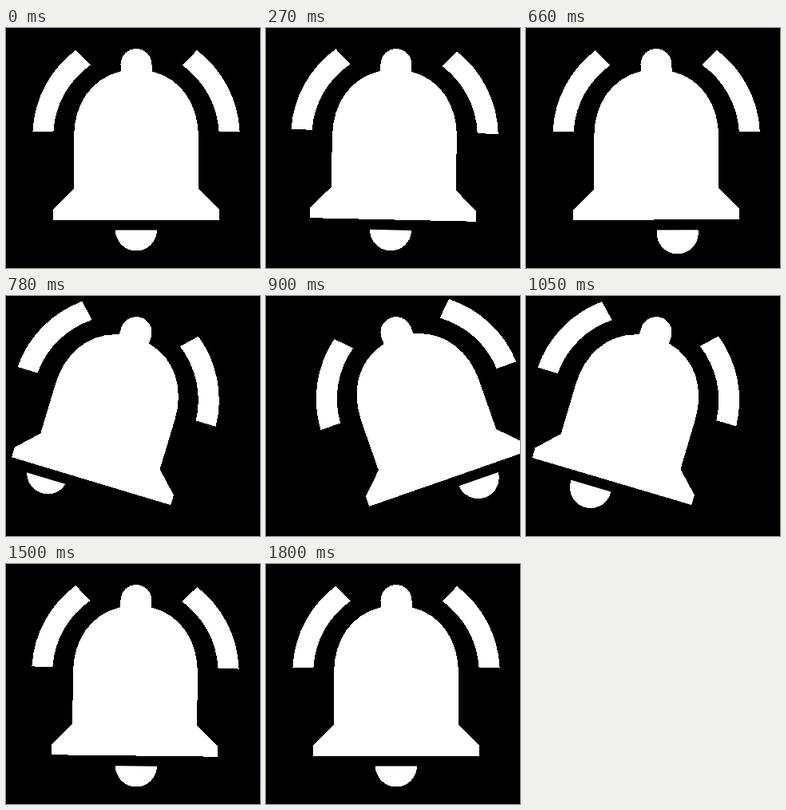
Write an HTML page that moves like this. It is 318x301 px and loops after 2.7 s.

```html
<!DOCTYPE html>
<html lang="en">
<head>
<meta charset="utf-8">
<title>Ringing bell</title>
<style>
  html, body { margin: 0; width: 100%; height: 100%; overflow: hidden; background: #000; }
  svg { display: block; width: 318px; height: 301px; fill: #fff; shape-rendering: crispEdges; }
</style>
</head>
<body>
<svg viewBox="0 0 318 301">
  <clipPath id="below"><rect x="-200" y="253.4" width="720" height="200"/></clipPath>
  <g id="bell">
    <g transform="translate(7 -6.5) scale(13)">
      <path d="M18 11c0-3.07-1.64-5.64-4.5-6.32V4c0-.83-.67-1.5-1.5-1.5s-1.5.67-1.5 1.5v.68C7.63 5.36 6 7.92 6 11v5l-2 2v1h16v-1l-2-2z"/>
      <path d="M7.58 4.08 6.15 2.65C3.75 4.48 2.17 7.3 2.03 10.5h2c.15-2.65 1.51-4.97 3.55-6.42z"/>
      <path d="M19.97 10.5h2c-.15-3.2-1.73-6.02-4.12-7.85l-1.42 1.43c2.02 1.45 3.39 3.77 3.54 6.42z"/>
    </g>
    <g clip-path="url(#below)"><circle id="clapper" cx="163" cy="253.5" r="26"/></g>
  </g>
</svg>
<script>
const LOOP = 2700, STEP = 30, END = 1800;
const bell = document.getElementById('bell');
const clapper = document.getElementById('clapper');

// [time in ms, angle in degrees]
const bellKeys = [[0, 0], [460, 2], [590, -13.7], [750, 20], [914, -20],
  [1082, 20], [1250, -18.3], [1460, 0.7], [1800, 0]];
const clapperKeys = [[0, 0], [460, 3], [600, -25], [762, 34], [928, -34],
  [1094, 34], [1262, -32.7], [1500, 0], [1800, 0]];
// How far the clapper hangs lower as it swings through the middle
const dropKeys = [[0, 0], [460, 0], [680, 6], [1020, 6], [1180, 3], [1450, 0], [1800, 0]];

function at(keys, t) {
  const i = Math.max(1, keys.findIndex(k => k[0] >= t));
  const [t0, a] = keys[i - 1], [t1, b] = keys[i];
  return a + (b - a) * (1 - Math.cos(Math.PI * (t - t0) / (t1 - t0))) / 2;
}

const turn = angle => `rotate(${angle.toFixed(3)} 163 45.5)`;

function draw(now) {
  const t = Math.min(END, Math.floor((now % LOOP) / STEP) * STEP);
  const swing = at(bellKeys, t), lag = at(clapperKeys, t);
  const drop = at(dropKeys, t) * Math.max(0, 1 - (lag / 34) ** 2);
  bell.setAttribute('transform', turn(swing));
  clapper.setAttribute('transform', `${turn(lag - swing)} translate(0 ${drop.toFixed(2)})`);
}

const start = performance.now();
function tick() {
  draw(performance.now() - start);
  requestAnimationFrame(tick);
}
tick();
</script>
</body>
</html>
```
